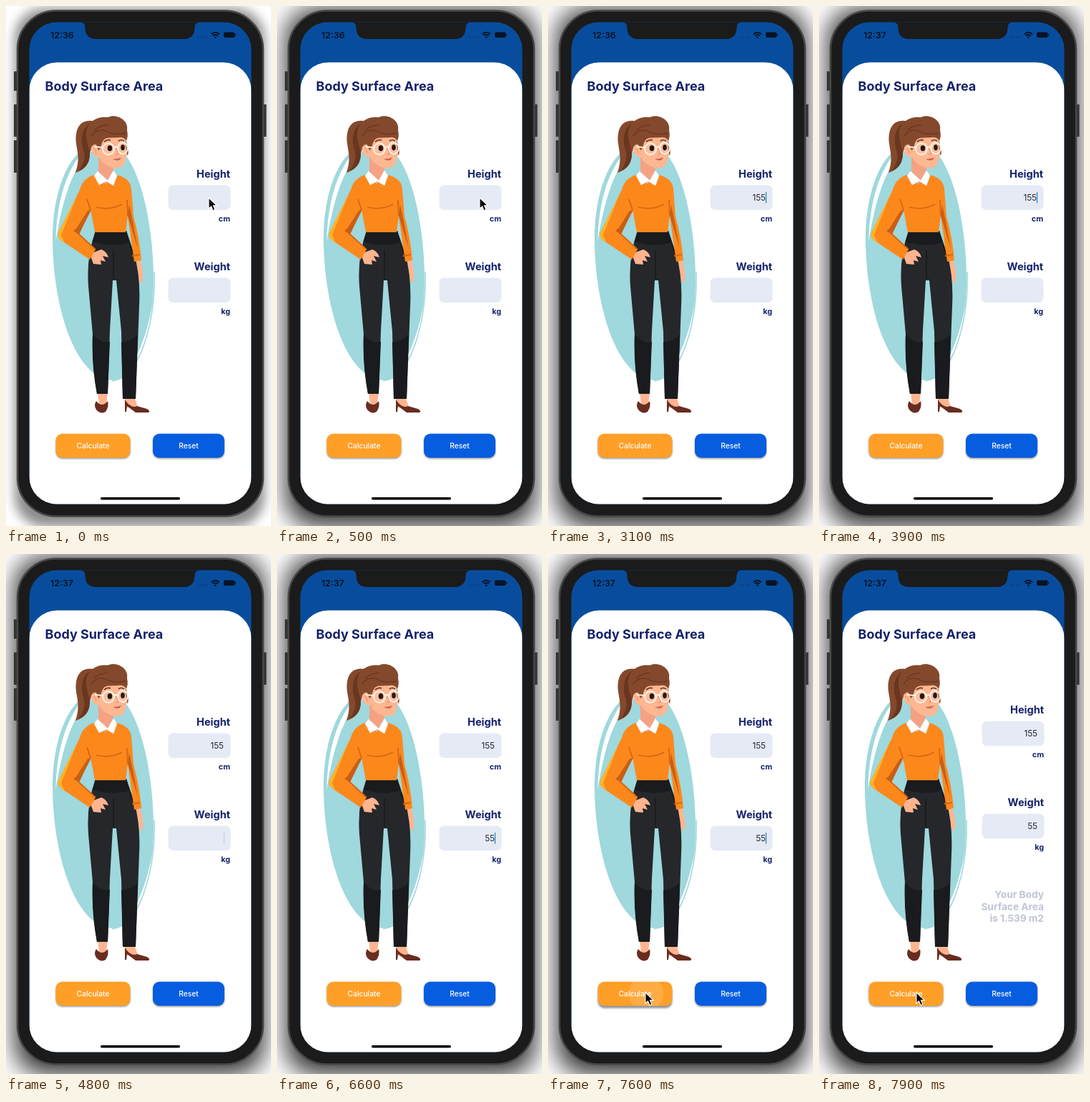
An HTML page for the animation above (8000 ms loop, 370 px wide and 724 px high).

```html
<!DOCTYPE html>
<html lang="en">
<meta charset="utf-8">
<title>Body Surface Area</title>
<style>
html, body { margin: 0; width: 100%; height: 100%; overflow: hidden; background: #fff }
svg { display: block; width: 370px; height: 724px; font-family: Inter, Roboto, sans-serif }
.b { font-weight: 700; fill: #15226b }
.end { text-anchor: end }
.label { font-size: 14.5px }
.unit { font-size: 10.8px }
.value { font-size: 11.7px; fill: #25272e }
.button { font-size: 10.3px; font-weight: 500; fill: #fff; text-anchor: middle }
.result { font-size: 13.7px }
</style>
<body>
<svg viewBox="0 0 370 724">
  <defs>
    <clipPath id="screen"><rect x="32.5" y="22.5" width="310" height="671" rx="38"/></clipPath>
    <clipPath id="calcClip"><rect x="69.5" y="595.5" width="104" height="33.5" rx="9"/></clipPath>
    <filter id="soft" x="-30%" y="-30%" width="160%" height="160%"><feGaussianBlur stdDeviation="1.1"/></filter>
  </defs>

  <!-- phone -->
  <rect id="shadow" x="12" y="3" width="349" height="722" rx="42"/>
  <path fill="none" stroke="#343434" stroke-width="5" d="M13.500 91v27M13.500 137v45M13.500 187v45M361 137v45"/>
  <rect x="16" y="6.5" width="343" height="704" rx="54" fill="#1b1b1b" stroke="#484848" stroke-width="2.5"/>
  <g clip-path="url(#screen)">
    <rect x="32" y="22" width="311" height="672" fill="#084d9d"/>
    <rect x="32.5" y="78.5" width="310" height="640" rx="39" fill="#fff"/>
    <path fill="#1b1b1b" d="M103 22q7.500 1 7.500 8q0 16 16 16h121q16 0 16-16q0-7 7.500-8z"/>
  </g>
  <text id="clock" x="62" y="45" font-size="12.4" font-weight="600" fill="#071325"></text>
  <path stroke="#0b3567" stroke-width="1.7" stroke-dasharray="1.7 2.3" d="M267.500 43.500h14"/>
  <g fill="none" stroke="#071325" stroke-width="1.8">
    <path d="M286.600 39.200q5.700-4.800 11.400 0M288.700 41.500q3.600-3 7.200 0"/>
    <path d="M291 43.600h2.600" stroke-width="2"/>
  </g>
  <rect x="304" y="36.5" width="15.5" height="7.5" rx="2" fill="#071325"/>
  <path d="M320.700 38.800v3" stroke="#071325"/>
  <rect x="132" y="684" width="111" height="3.5" rx="1.7"/>

  <text class="b" x="54.5" y="117.5" font-size="18">Body Surface Area</text>

  <!-- illustration -->
  <g id="figure">
    <path fill="#9fd8dd" d="M103 203C78 225 65 275 65 322C65 420 97 521 150 521C185 521 206 450 206 383C206 310 190 232 163 203Z"/>
    <path fill="#fff" d="M101 211C83 236 70 276 69.500 328C75 290 86 246 102 222zM205 412C200 461 185 505 160 517C181 501 198 456 205 412"/>
    <path fill="none" stroke="#9fd8dd" stroke-width="1.5" d="M207 370C209 439 187 519 148 522"/>

    <!-- ponytail and neck -->
    <path fill="#84492c" d="M121 160C109 158 100 164 98 178C95 195 106 207 97 232C112 228 118 215 117 201C115 189 114 178 119 172z"/>
    <path fill="#693620" d="M116 164C104 173 104 190 109 203Q112 216 101 230Q118 224 117 203C115 188 114 175 119 170z"/>
    <path fill="#f4a283" d="M129 206L129 240L142 249L151 234L148 219z"/>
    <!-- face -->
    <path fill="#fdb791" d="M127 178Q144 167 165 178L168 193L171 205Q167 207 167 215Q164 226 155 226Q139 225 130 211Q119 209 119 199Q121 191 127 193z"/>
    <path fill="#84492c" d="M112 181C111 164 124 153 142 155C155 149 172 160 169 173Q171 181 168 188Q165 182 157 183C147 184 139 182 136 187C132 192 134 198 129 201L126 193Q119 191 118 204Q113 194 112 181zM167 187q5 11 3 22q-3-8-3-22"/>
    <path fill="none" stroke="#693620" stroke-width="1.3" d="M119 181Q127 170 139 174Q151 181 167 177M123 173Q132 165 143 166"/>
    <path fill="none" stroke="#6b3022" stroke-width="1.7" d="M137 189q5-4 9-2M157 188q4-3 8 0"/>
    <g fill="#fff4e9" fill-opacity=".15" stroke="#fff3e7" stroke-width="2">
      <circle cx="143" cy="199" r="8"/><ellipse cx="163" cy="198" rx="7" ry="8"/>
      <path fill="none" d="M151 197q2-2 5 0M135 197l-11-1"/>
    </g>
    <g fill="#221a19"><ellipse cx="145" cy="198" rx="3.3" ry="4"/><ellipse cx="163" cy="197" rx="2.8" ry="4"/></g>
    <path fill="none" stroke="#e58b70" d="M154 198l3 8-4 1M122 198q4 2 4 7"/>
    <path fill="#d85b4f" d="M149 213q7 0 12-2q-3 7-12 2"/>

    <!-- hands, feet -->
    <g fill="#ffb48f">
      <path d="M180 355L187 354Q192 365 191 383L186 385L185 375L181 373z"/>
      <path d="M128 537h14l-2 18h-10zM165 544h14l5 14-15 1z"/>
    </g>
    <path fill="#692c20" d="M126 550Q134 560 142 550Q144 558 139 565Q132 569 126 562Q122 556 126 550M166 548Q174 561 183 557L197 561Q202 564 199 566H181L169 557L168 565h-2z"/>

    <!-- trousers -->
    <path fill="#25272a" d="M125 313h43l11 32q9 32 7 72l-5 130h-18l-2-94-7-71h-5l-4 70-3 88h-15q-7-42-6-83l-6-67q-3-41 10-77"/>
    <path fill="#191b1e" d="M121 457q13 15 24 10l-3 73h-15q-8-41-6-83M161 468q13 0 23-11l-3 90h-18z"/>
    <path fill="#191b1e" d="M125 313h43l5 16q-25 8-52-1z"/>
    <path fill="none" stroke="#111315" d="M150 340v40M118 340q8 12 18 14M173 331q1 12 9 17"/>
    <path fill="#ffb48f" d="M117 345L133 339Q141 342 143 350L135 348L139 356L132 354L133 360L122 359z"/>

    <!-- sweater -->
    <path fill="#fc881c" d="M126 234Q107 239 103 256L73 316Q71 322 78 327L117 353L125 339L102 318L118 283L124 315H167L170 292L179 356L189 354Q186 321 178 293L175 255Q174 239 151 234L139 248z"/>
    <path fill="#ffb424" d="M100 262L73 316Q71 322 78 327L82 330L77 319z"/>
    <path fill="none" stroke="#d76614" stroke-width="1.8" d="M113 269L118 284L101 317L125 339M126 280Q145 285 162 276M170 292L169 270M176 348l11-2"/>
    <path fill="#c85f15" d="M102 318L94 313L98 310L114 285L118 284zM170 292L172 277L177 300L184 338z"/>
    <path fill="#fff" stroke="#e5e5e8" stroke-width=".7" d="M128 230L123 236L130 249L140 244L150 250L155 236L150 229L142 243z"/>
  </g>

  <!-- form -->
  <g id="form">
    <g id="height"></g>
    <g id="weight" transform="translate(0 129)"></g>
  </g>
  <g id="result" class="b end result">
    <text x="314" y="479">Your Body</text>
    <text x="314" y="495.7">Surface Area</text>
    <text x="314" y="512.4">is 1.539 m2</text>
  </g>

  <!-- buttons -->
  <g fill="#000" fill-opacity=".4" filter="url(#soft)">
    <rect id="calcShadow" x="69.5" y="597" width="104" height="33.5" rx="9"/>
    <rect x="205" y="597" width="100" height="33.5" rx="9"/>
  </g>
  <rect x="69.5" y="595.5" width="104" height="33.5" rx="9" fill="#ff9f27"/>
  <rect x="205" y="595.5" width="100" height="33.5" rx="9" fill="#075de0"/>
  <text class="button" x="121.5" y="615.5">Calculate</text>
  <text class="button" x="255" y="615.5">Reset</text>
  <circle id="ripple" cx="137" cy="612" fill="#fff" clip-path="url(#calcClip)"/>
  <path id="cursor" d="M0 0V15.200L3.500 12L6 17.700L8.900 16.500L6.400 10.900H11.300Z" stroke="#fff" stroke-width="1.1"/>
</svg>
<script>
const $ = id => document.getElementById(id);
const clamp = x => Math.max(0, Math.min(1, x));
const ease = x => x * x * (3 - 2 * x);

function addField(id, label, unit) {
  $(id).innerHTML = `
    <text class="b end label" x="313" y="238.5">${label}</text>
    <rect x="226.5" y="249.5" width="87" height="34.5" rx="7" fill="#e6eaf5"/>
    <text class="end value" id="${id}Value" x="304" y="271"></text>
    <path id="${id}Caret" d="M304.500 259v15.500" stroke="#2788d2" stroke-width="1.3"/>
    <text class="b end unit" x="313" y="300">${unit}</text>`;
}
addField('height', 'Height', 'cm');
addField('weight', 'Weight', 'kg');

const ACTIVE = 500, CLICK = 7400, DONE = 7650;
const fields = [
  { id: 'height', text: '155', focus: 750, blur: 4150, keys: [2000, 2400, 2600] },
  { id: 'weight', text: '55', focus: 4150, blur: DONE, keys: [5200, 5500] }
];

function caretOpacity(age) {
  const p = age % 1000;
  return p < 500 ? 1 : Math.max(clamp(1 - (p - 500) / 200), clamp((p - 800) / 200));
}

function drawField({ id, text, focus, blur, keys }, t) {
  const typed = keys.filter(k => k <= t);
  $(id + 'Value').textContent = text.slice(0, typed.length);
  const last = typed.length ? typed[typed.length - 1] : focus;
  $(id + 'Caret').style.opacity = t >= focus && t < blur ? caretOpacity(t - last) : 0;
}

function draw(t) {
  const done = t >= DONE, active = t >= ACTIVE;
  $('clock').textContent = t < 3800 ? '12:36' : '12:37';
  $('shadow').style.filter = active ? 'blur(17px)' : 'blur(8px)';
  $('shadow').style.opacity = active ? .8 : .45;
  fields.forEach(f => drawField(f, t));

  $('form').setAttribute('transform', done ? 'translate(1 -16.7)' : '');
  $('figure').setAttribute('transform', done ? 'translate(-1 0)' : '');
  $('result').style.opacity = clamp((t - DONE) / 950);

  const press = t - CLICK;
  $('calcShadow').setAttribute('y', press > 0 && press < 250 ? 599 : 597);
  $('ripple').setAttribute('r', press > 0 ? 12 + press * .06 : 0);
  $('ripple').style.opacity = .2 * clamp((300 - press) / 150);

  const k = ease(clamp((t - 6700) / 600));
  $('cursor').setAttribute('transform', `translate(${283 - 147 * k} ${267 + 343.5 * k})`);
  $('cursor').style.display = t < 1000 || t >= 6700 ? '' : 'none';
}

const start = performance.now();
function tick() {
  draw((performance.now() - start) % 8000);
  requestAnimationFrame(tick);
}
tick();
</script>
</body>
</html>
```
